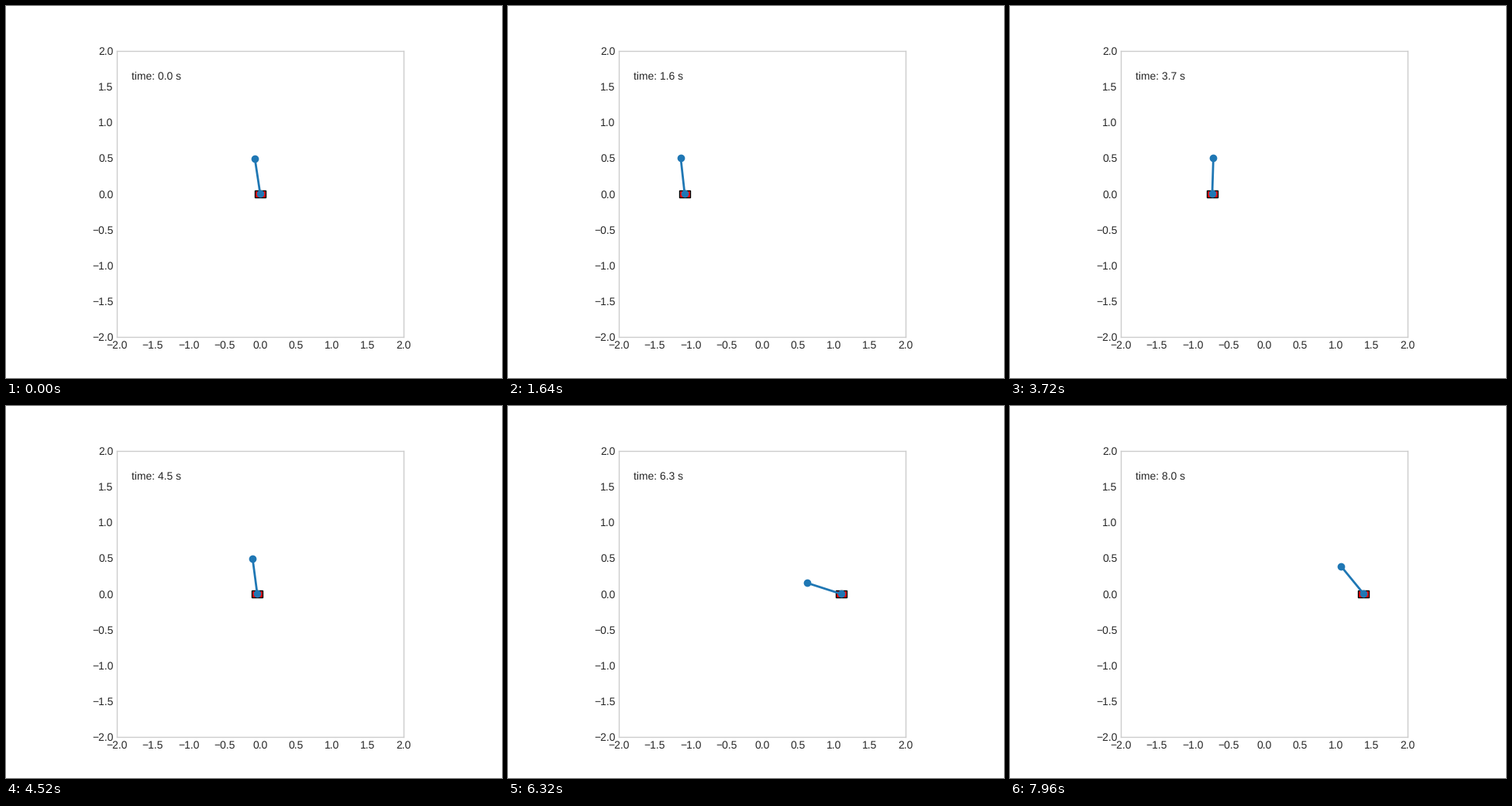
Animation of 640 by 480 pixels, one loop 8 s. Source, as a matplotlib script:

```python
import numpy as np
import matplotlib.pyplot as plt
from matplotlib.animation import FuncAnimation
from matplotlib.patches import Rectangle

plt.rcParams.update({"font.family": "Liberation Sans", "font.size": 10,
                     "text.hinting": "none"})

STEP = 0.04
FRAMES = 200
POLE = 0.5
SHARE = 1 / 3          # bob mass / total mass
UPRIGHT = 3.725        # a moment when the whirling pole points straight up
INK = "0.15"


def falling(t):
    """Lean that is first damped, then runs away to the left."""
    lean = 8.6 * np.exp(-1.5 * t) + 139 * np.exp(3.65 * (t - 2.52))
    return np.radians(lean)


def whirling(t):
    """Slowing turns, quick at the bottom and slow at the top."""
    s = t - UPRIGHT
    p = 2 * np.pi * (1.3105 * s - 0.023 * s ** 2)
    return (p - 0.315 * np.sin(p) + 0.077 * np.sin(2 * p)
            - 0.025 * np.sin(3 * p))


def centre(t):
    """Centre of mass: speeds up to the left, rebounds, slows to the right."""
    s = t - UPRIGHT
    leftward = -0.025 - 1.1 * (np.hypot(t, 0.886) - 0.886)
    rightward = -0.716 + 0.902 * s - 0.1015 * s ** 2
    return np.maximum(leftward, rightward)


times = np.arange(FRAMES) * STEP
angle = np.where(times < 2.58, falling(times), whirling(times))
cart_x = centre(times) + SHARE * POLE * np.sin(angle)
tip_x = cart_x - POLE * np.sin(angle)
tip_y = POLE * np.cos(angle)

fig, ax = plt.subplots(figsize=(6.4, 4.8), dpi=100, facecolor="white")
ax.set(xlim=(-2, 2), ylim=(-2, 2), aspect="equal")
ticks = np.linspace(-2, 2, 9)
ax.set_xticks(ticks)
ax.set_yticks(ticks)
ax.tick_params(length=0, pad=3.5, labelcolor=INK)
for spine in ax.spines.values():
    spine.set(color="0.8", linewidth=1)

W, H = 0.15, 0.1
cart = ax.add_patch(Rectangle((-W / 2, -H / 2), W, H, fc="r", ec="k", lw=1))
pole, = ax.plot([], [], "o-", lw=2, ms=6, color="#1f77b4")
clock = ax.text(0.05, 0.9, "", transform=ax.transAxes, color=INK)


def draw(i):
    cart.set_x(cart_x[i] - W / 2)
    pole.set_data([cart_x[i], tip_x[i]], [0, tip_y[i]])
    clock.set_text(f"time: {times[i]:.1f} s")
    return cart, pole, clock


anim = FuncAnimation(fig, draw, frames=FRAMES, interval=40,
                     repeat=True, repeat_delay=0, blit=False)
plt.show()
```
